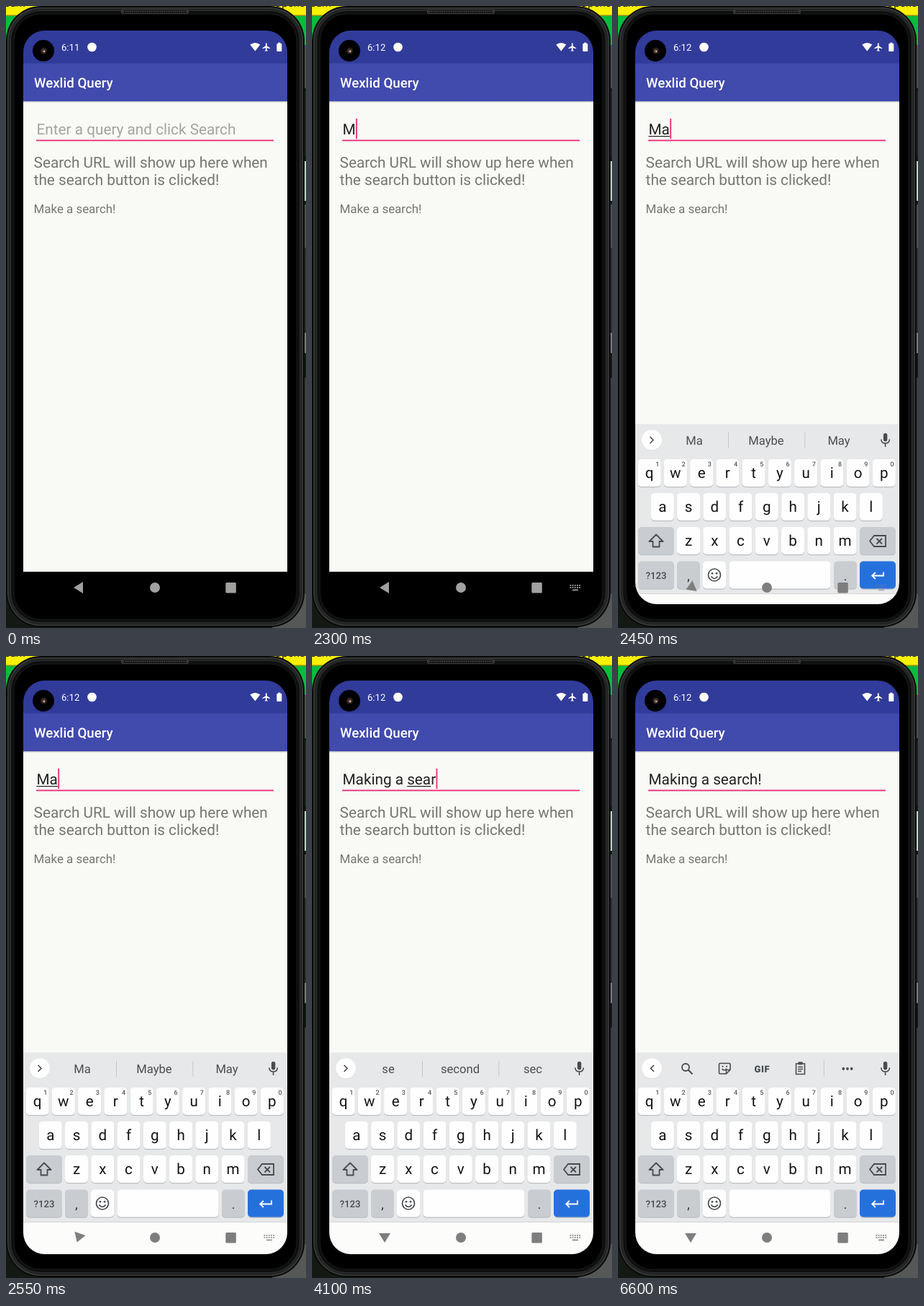
Write an HTML page that moves like this. It is 417 px wide and 862 px high and loops after 6850 ms.

```html
<!DOCTYPE html>
<html lang="en">
<head>
<meta charset="utf-8">
<title>Search app demo</title>
<style>
  html, body { margin: 0; width: 100%; height: 100%; overflow: hidden; background: #191b1a; }
  svg { display: block; width: 417px; height: 862px; }
  text { font-family: Roboto, sans-serif; white-space: pre; text-rendering: geometricPrecision; }
  .mid { text-anchor: middle; }
</style>
</head>
<body>
<svg id="stage" viewBox="0 0 417 862"></svg>
<script>
const LOOP = 6850, STEP = 50;
const PHRASE = 'Making a search!';
const INPUT_X = 42.5, INPUT_SIZE = 20.75;
const PINK = '#ec347f', INK = '#484b4e';

// [time, letters shown]
const TYPED = [[0, 0], [2200, 1], [2350, 2], [2750, 3], [2850, 4], [2950, 5], [3050, 6],
  [3150, 7], [3250, 8], [3300, 9], [3450, 10], [3650, 11], [3900, 12], [4100, 13],
  [4250, 14], [4400, 15], [4950, 16]];
// [time, first letter, end] of the word being composed
const MARKED = [[0, 0, 0], [2400, 0, 2], [2800, 0, 3], [2900, 0, 4], [3000, 0, 5],
  [3100, 0, 6], [3200, 0, 0], [3750, 9, 11], [4000, 9, 12], [4200, 9, 13],
  [4300, 9, 14], [4450, 9, 15], [5150, 0, 0]];
const HINTS = [[0, 'Ma|Maybe|May'], [2800, 'Mak|Make|Makes'], [2900, 'Maki|Making|Makin'],
  [3050, 'Making|Marking|Makings'], [3200, 'a|the|it'], [3300, 'lot|new|few'],
  [3750, 'se|second|sec'], [4200, 'sear|search|seat'], [4500, 'search|searching|searched'],
  [5150, '']];
const CARET = [[0, 0], [350, 1], [850, 0], [1350, 1], [1850, 0], [2200, 1],
  [5500, 0], [6150, 1], [6600, 0]];

const rect = (x, y, w, h, fill, r = 0, more = '') =>
  `<rect x="${x}" y="${y}" width="${w}" height="${h}" rx="${r}" fill="${fill}" ${more}/>`;
const disc = (x, y, r, fill, more = '') =>
  `<circle cx="${x}" cy="${y}" r="${r}" fill="${fill}" ${more}/>`;
const text = (x, y, size, fill, str, more = '') =>
  `<text x="${x}" y="${y}" font-size="${size}" fill="${fill}" ${more}>${str}</text>`;
const mid = (x, y, size, fill, str, more = '') => text(x, y, size, fill, str, 'class="mid" ' + more);
const fillPath = (d, fill, more = '') => `<path d="${d}" fill="${fill}" ${more}/>`;
const line = (d, stroke, width = 1.6, more = '') =>
  `<path d="${d}" fill="none" stroke="${stroke}" stroke-width="${width}" ${more}/>`;

function desk() {
  return rect(0, 0, 417, 14, '#f7f000') + rect(0, 14, 417, 40, '#08bd3c')
    + rect(0, 12.5, 417, 1.5, '#8a8d1c')
    + rect(0, 54, 417, 808, '#141a13')
    + rect(412, 54, 5, 60, '#4a4e4c') + rect(412, 118, 5, 90, '#202322')
    + rect(412, 215, 5, 55, '#b9d4c3') + rect(412, 275, 5, 60, '#4d504f')
    + rect(412, 335, 5, 118, '#2c2e2e') + rect(412, 453, 5, 28, '#777a79')
    + rect(412, 515, 5, 300, '#3a3c3b') + rect(370, 815, 47, 47, '#555856')
    + text(27, 1.2, 15, '#222', 'cam', 'text-anchor="end"')
    + text(373, 1.2, 15, '#222', 'Opens');
}

function shell() {
  const ring = (inset, fill, r) =>
    rect(inset, inset, 415 - 2 * inset, 861 - 2 * inset, fill, r);
  return ring(0, '#0a0a0a', 48) + ring(2, '#383939', 46) + ring(3.5, '#222323', 45)
    + ring(6, '#2d2e2e', 42) + ring(7, '#0e0f0f', 41) + ring(10.5, '#191a1a', 38)
    + ring(11.5, '#000', 37)
    + rect(160, 4.5, 94, 6.5, '#3b3b3b', 3) + rect(162, 5.5, 90, 4.5, 'url(#mesh)', 2);
}

function app() {
  const plane = 'M21 16v-2l-8-5V3.5c0-.83-.67-1.5-1.5-1.5S10 2.67 10 3.5V9l-8 5v2l8-2.5V19l-2 1.5V22l3.5-1 3.5 1v-1.5L13 19v-5.5l8 2.5z';
  return rect(24, 132, 367, 652, '#f9faf5')
    + rect(24, 132, 367, 2.5, 'url(#drop)')
    + rect(24, 34, 367, 46, '#313b9a') + rect(24, 79.5, 367, 52.5, '#414aad')
    + disc(52, 62, 15, '#000') + disc(52.5, 62, 4.5, '#2a201d') + disc(52.5, 62.5, 2.4, '#6b4c3e')
    + disc(53.2, 63, 1, '#e6d5ca')
    + text(77, 62, 13.1, '#fff', '6:11', 'id="clock"')
    + disc(119.5, 57, 6.3, '#fff')
    + fillPath('M339.3 53.6Q346.3 48.4 353.3 53.6L346.3 62.6z', '#fff')
    + fillPath(plane, '#fff', 'transform="translate(355.2 50.2) scale(.57)"')
    + rect(376.3, 52, 7, 11, '#fff', 1) + rect(378.2, 50.7, 3.2, 2, '#fff')
    + text(39, 113, 18.7, '#fff', 'Wexlid Query', 'font-weight="500"')
    + text(INPUT_X, 178.3, INPUT_SIZE, '#a3a4a1', 'Enter a query and click Search', 'id="holder"')
    + text(INPUT_X, 178.3, INPUT_SIZE, '#222', '', 'id="entry"')
    + rect(0, 180, 0, 1.2, '#222', 0, 'id="mark"')
    + rect(42, 185.4, 330, 1.9, PINK)
    + rect(0, 156, 1.9, 28, PINK, 0, 'id="caret"')
    + text(38.6, 223.7, INPUT_SIZE, '#757673', 'Search URL will show up here when')
    + text(38.6, 248, INPUT_SIZE, '#757673', 'the search button is clicked!')
    + text(38.6, 287, 16.9, '#757673', 'Make a search!')
    + rect(24, 784, 367, 45, '#000');
}

function keyBox(x, y, w, fill = '#fdfefd') {
  return rect(x, y + 1.2, w, 38, '#bcbfc2', 5) + rect(x, y, w, 38, fill, 5);
}

function keyRow(letters, first, y, digits = '') {
  return [...letters].map((c, i) => {
    const x = first + 36.25 * i;
    return keyBox(x - 16, y, 32) + mid(x, y + 25.5, 20.6, '#141414', c)
      + (digits ? mid(x + 11.3, y + 9.8, 9, '#55585b', digits[i], 'font-weight="500"') : '');
  }).join('');
}

function toolbar() {
  return line('M50 567L45.500 571.500L50 576', INK)
    + `<circle cx="94" cy="570" r="5" fill="none" stroke="${INK}" stroke-width="1.8"/>`
    + line('M97.800 573.800L103.500 579.500', INK, 2)
    + line('M142 564.500H154.500Q156 564.500 156 566V573.500L150.500 579H142Q140.500 579 140.500 577.500V566Q140.500 564.500 142 564.500zM156 573.500H150.500V579M144.500 572Q147.500 576 151 572', INK, 1.6)
    + disc(145.5, 568.8, 1.1, INK) + disc(151, 568.8, 1.1, INK)
    + mid(200.3, 576.5, 13, INK, 'GIF', 'font-weight="900" letter-spacing=".5"')
    + line('M247.500 565H259.500V579.500H247.500zM250 569.500H257M250 572.500H257M250 575.500H255', INK, 1.6)
    + rect(250.3, 562.5, 6.4, 4, INK, 1)
    + rect(285.8, 561, 1, 22, '#c5c8ca')
    + [313.3, 319, 324.7].map(x => disc(x, 572, 1.9, INK)).join('');
}

function keyboard() {
  const grey = '#c9cdd1';
  return rect(24, 549, 367, 1.5, '#eff1ee') + rect(24, 550, 367, 235, '#e6e8e9')
    + rect(24, 784.5, 367, 330, '#fcfdfb') + rect(24, 784, 367, 1, '#d3d6d7')
    + disc(47, 572.2, 14, '#cfd2d3') + disc(47, 571.5, 14, '#fdfefd')
    + '<g id="words">' + line('M44.500 567L49 571.500L44.500 576', INK)
    + [106, 206, 307].map(x => mid(x, 578, 16.6, '#4b4e50', '', 'data-hint=""')).join('')
    + rect(153, 561, 1, 22, '#c5c8ca') + rect(259.3, 561, 1, 22, '#c5c8ca') + '</g>'
    + '<g id="tools">' + toolbar() + '</g>'
    + rect(368.9, 562, 5.4, 11.5, INK, 2.7)
    + line('M365.800 570.500Q366 576 371.600 576T377.400 570.500M371.600 576V581', INK)
    + keyRow('qwertyuiop', 43.6, 598, '1234567890')
    + keyRow('asdfghjkl', 61.8, 645)
    + keyBox(28, 692, 50, grey) + keyRow('zxcvbnm', 98, 692) + keyBox(336, 692, 50, grey)
    + line('M53 702.500L62.500 712H57.500V719.500H48.500V712H43.500z', INK, 1.8, 'stroke-linejoin="round"')
    + line('M356 704H372V719H356L350 711.500zM359.500 708L367 715.500M367 708L359.500 715.500', INK, 1.8)
    + keyBox(28, 739.5, 50, grey) + keyBox(82, 739.5, 32, grey) + keyBox(118, 739.5, 32)
    + keyBox(154.5, 739.5, 141) + keyBox(300, 739.5, 32, grey) + keyBox(336, 739.5, 50, '#2571dc')
    + mid(53, 764, 13.2, INK, '?123', 'font-weight="500"')
    + mid(98, 766, 17, '#222', ',') + mid(316, 766, 17, '#222', '.')
    + `<circle cx="134" cy="758.5" r="8.5" fill="none" stroke="${INK}" stroke-width="1.7"/>`
    + disc(131, 756.3, 1.4, INK) + disc(137, 756.3, 1.4, INK)
    + line('M129.500 760.500Q134 766.500 138.500 760.500', INK)
    + line('M369 754.500V759.500H353.500M357.800 755L353.300 759.500L357.800 764', '#fff', 1.9);
}

function nav() {
  let dots = '';
  for (let i = 0; i < 10; i++) {
    dots += rect(358.4 + i % 5 * 3.2, i < 5 ? 802 : 805, 1.9, 1.8, 'inherit');
  }
  return '<g id="nav">'
    + '<path id="back" d="M-7 0L6 -8V8z"/>'
    + disc(207, 806, 7, 'inherit') + rect(305.3, 799, 14.5, 14.5, 'inherit', 1.5)
    + '<g id="ime">' + dots + rect(362, 808.5, 8, 1.8, 'inherit') + '</g></g>';
}

const $ = id => document.getElementById(id);
$('stage').innerHTML = `<defs>
  <clipPath id="glass">${rect(24, 34, 367, 795, '#000', 30)}</clipPath>
  <pattern id="mesh" width="3" height="3" patternUnits="userSpaceOnUse">
    ${rect(0, 0, 3, 3, '#161616')}${disc(1.5, 1.5, .8, '#555')}</pattern>
  <linearGradient id="drop" x2="0" y2="1"><stop stop-color="#b9bbb9"/>
    <stop offset="1" stop-color="#f9faf5"/></linearGradient></defs>`
  + desk() + shell()
  + `<g clip-path="url(#glass)">${app()}<g id="keys">${keyboard()}</g>${nav()}</g>`;

const pen = document.createElement('canvas').getContext('2d');
pen.textRendering = 'geometricPrecision';
const width = n => {
  pen.font = `${INPUT_SIZE}px Roboto, sans-serif`;
  return pen.measureText(PHRASE.slice(0, n)).width;
};
const at = (steps, t) => steps.findLast(s => s[0] <= t);
const part = (t, from, to) => Math.min(1, Math.max(0, (t - from) / (to - from)));
const show = (id, on) => $(id).setAttribute('visibility', on ? 'visible' : 'hidden');
const hintSlots = document.querySelectorAll('[data-hint]');

function draw(t) {
  const n = at(TYPED, t)[1];
  $('entry').textContent = PHRASE.slice(0, n);
  show('holder', n === 0);
  $('clock').textContent = t < 1750 ? '6:11' : '6:12';

  const [, from, to] = at(MARKED, t);
  $('mark').setAttribute('x', INPUT_X + width(from));
  $('mark').setAttribute('width', width(to) - width(from));
  $('caret').setAttribute('x', INPUT_X + width(n) + (n ? 0.3 : 0));
  show('caret', at(CARET, t)[1]);

  const hints = at(HINTS, t)[1];
  const words = hints.split('|');
  hintSlots.forEach((slot, i) => slot.textContent = words[i] || '');
  $('words').style.display = hints ? '' : 'none';
  $('tools').style.display = hints ? 'none' : '';

  const up = part(t, 2350, 2540);
  $('keys').setAttribute('transform', `translate(0 ${Math.round(280 * (1 - up) ** 3)})`);
  $('keys').style.display = up > 0 ? '' : 'none';

  const turn = part(t, 2400, 2590);
  $('back').setAttribute('transform', `translate(101 806) rotate(${-90 * turn})`);
  $('nav').setAttribute('fill', up > 0 ? '#7d7e7d' : '#a0a09f');
  $('ime').setAttribute('opacity', up > 0 ? 0.4 + 0.5 * turn : 1);
  show('ime', t >= 2250);
}

const start = performance.now();
function tick() {
  const t = (performance.now() - start) % LOOP;
  draw(Math.floor(t / STEP) * STEP);
  requestAnimationFrame(tick);
}
tick();
</script>
</body>
</html>
```
